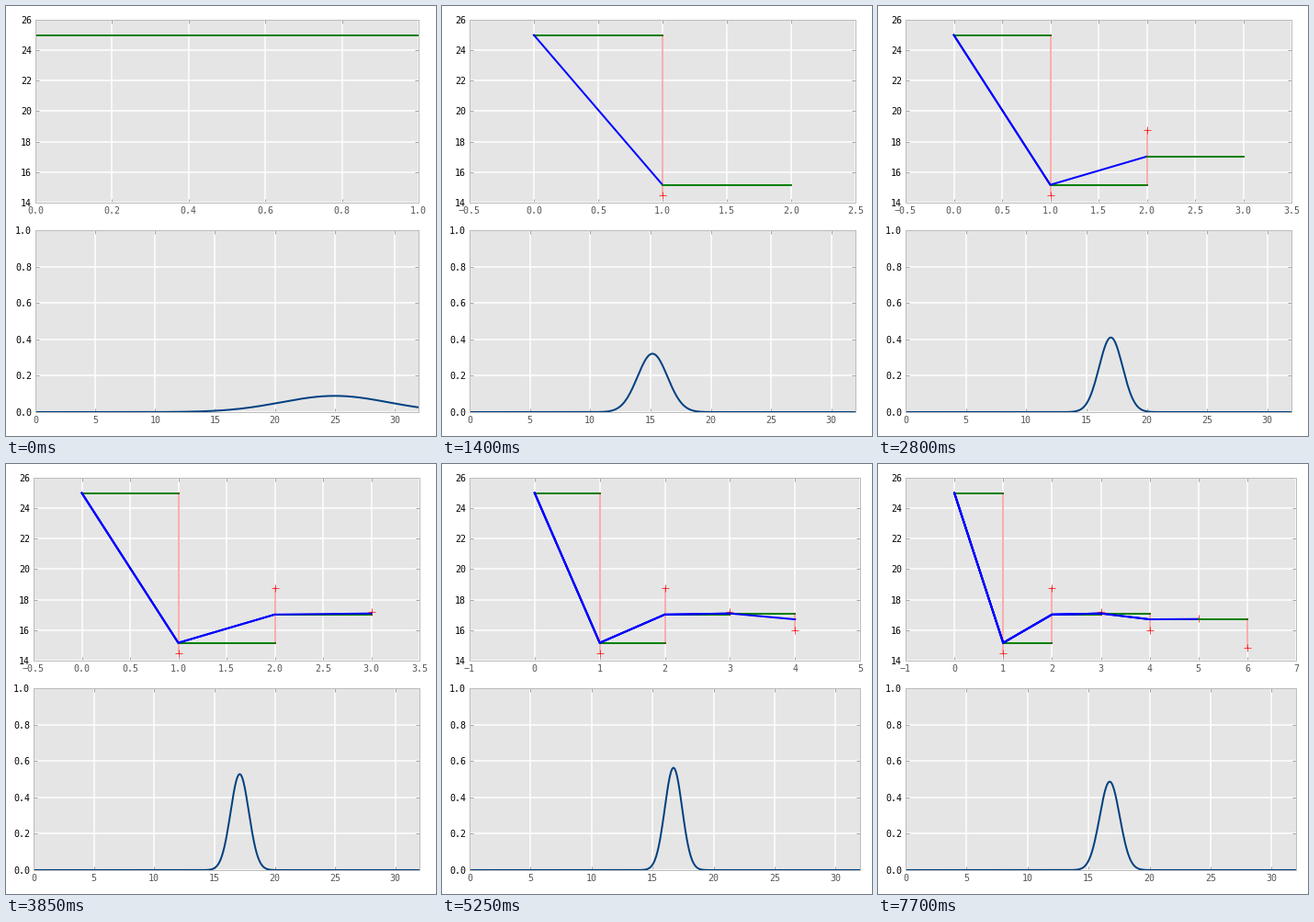
A matplotlib script that plays this animation: 468x468 px, repeating every 8 s.

```python
import numpy as np
import matplotlib.pyplot as plt
from matplotlib.animation import FuncAnimation
from matplotlib.ticker import MultipleLocator

SIZE, DPI = 468, 72
TICK_MS, TICKS, HOLD = 50, 160, 7      # each step is held for 7 ticks

plt.rcParams.update({
    "font.family": "DejaVu Sans Mono",
    "font.size": 10,
    "axes.facecolor": "#e5e5e5",
    "axes.edgecolor": "#bcbcbc",
    "axes.linewidth": 1,
    "axes.axisbelow": True,
    "lines.linewidth": 2,
})

# One-dimensional Kalman filter
OBS = [14.46, 18.76, 17.20, 15.99, 16.77, 14.84]
PROCESS_VAR, SENSOR_VAR = 0.2, 1.44


def run_filter(mean, var):
    """Return the (mean, var) pairs before and after each observation."""
    priors, posts = [], []
    for z in OBS:
        priors.append((mean, var))
        gain = var / (var + SENSOR_VAR)
        mean, var = mean + gain * (z - mean), (1 - gain) * var
        posts.append((mean, var))
        var += PROCESS_VAR
    return priors, posts


priors, posts = run_filter(25.0, 20.0)
path = [priors[0][0]] + [m for m, _ in posts]

# (x min, x max, tick spacing) of the upper plot in each cycle
VIEWS = [(-0.2, 1.2, 0.2), (-0.5, 2.5, 0.5), (-0.5, 3.5, 0.5),
         (-1, 5, 1), (-1, 6, 1), (-1, 7, 1)]

fig = plt.figure(figsize=(SIZE / DPI, SIZE / DPI), dpi=DPI, facecolor="white")
top = fig.add_axes([0.1, 0.55, 0.8, 0.4])
low = fig.add_axes([0.1, 0.05, 0.8, 0.4])


def place(ax, left, right, upper, lower):
    ax.set_position([left / SIZE, 1 - lower / SIZE,
                     (right - left) / SIZE, (lower - upper) / SIZE])


def dress(ax, ylim, ystep):
    ax.set_autoscale_on(False)
    ax.set_ylim(*ylim)
    ax.yaxis.set_major_locator(MultipleLocator(ystep))
    ax.grid(True, color="white", linestyle="-", linewidth=1.5)
    ax.tick_params(direction="in", length=4, width=0.5, pad=4,
                   color="#555555", top=True, right=True)
    ax.tick_params(axis="x", labelcolor="#555555")
    ax.tick_params(axis="y", labelcolor="black")


dress(top, (14, 26), 2)
dress(low, (0, 1), 0.2)
low.set_xlim(0, 32)
low.xaxis.set_major_locator(MultipleLocator(5))

# Artists in the order they appear: prediction, reading, residual, estimate
layers = []
for k, z in enumerate(OBS):
    guess = priors[k][0]
    layers += top.plot([k, k + 1], [guess, guess], color="green")
    layers += top.plot([k + 1], [z], "+", color="red", ms=8, mew=0.7, zorder=1)
    layers += top.plot([k + 1, k + 1], [guess, z], color="red", alpha=0.3)
    layers += top.plot(range(k + 2), path[:k + 2], color="blue")

xs = np.linspace(0, 32, 321)
bell, = low.plot(xs, 0 * xs, color="#004080")


def density(mean, var):
    return np.exp(-(xs - mean) ** 2 / (2 * var)) / np.sqrt(2 * np.pi * var)


def show(step):
    cycle, phase = divmod(step, 4)
    if step == 0:
        view, left, right = (0, 1, 0.2), 32, 449
    else:
        view, left, right = VIEWS[cycle], 30, 450 if cycle < 3 else 455
    top.set_xlim(*view[:2])
    top.xaxis.set_major_locator(MultipleLocator(view[2]))
    place(top, left, right, 15, 214)
    place(low, left, right, 244, 442)
    for i, layer in enumerate(layers):
        layer.set_visible(i <= step)
    bell.set_ydata(density(*(posts if phase == 3 else priors)[cycle]))


def update(tick):
    show(tick // HOLD)
    return layers + [bell]


def init():
    return update(0)


anim = FuncAnimation(fig, update, frames=TICKS, init_func=init,
                     interval=TICK_MS, repeat=True, repeat_delay=0, blit=False)
plt.show()
```
